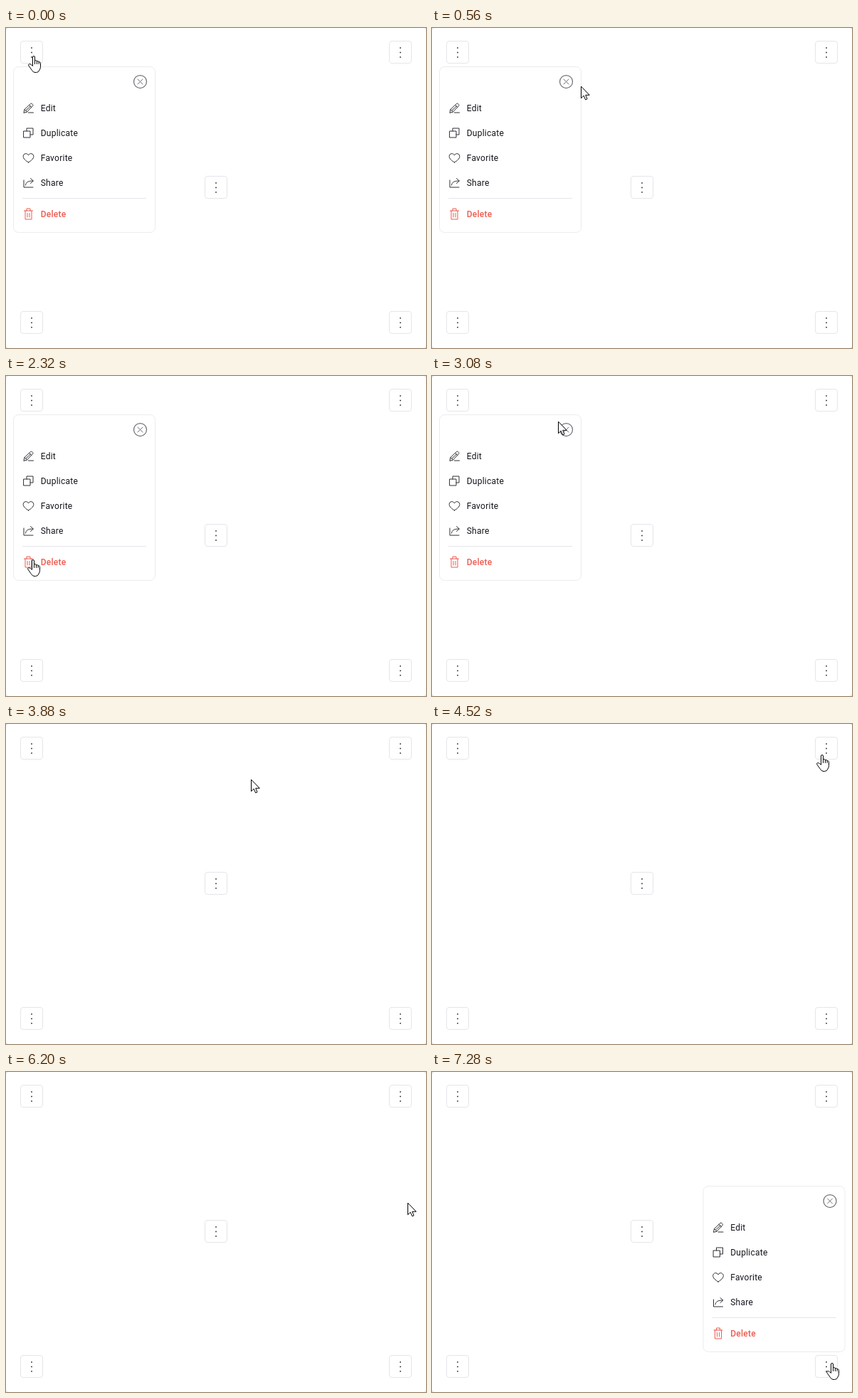
Animation of 590 by 450 pixels, one loop 8 s. Source, as an HTML page with a canvas:

```html
<!DOCTYPE html>
<html lang="en">
<head>
<meta charset="utf-8">
<title>Context menu</title>
<style>
html, body { margin: 0; width: 100%; height: 100%; overflow: hidden; background: #fff; }
canvas { display: block; width: 590px; height: 450px; }
</style>
</head>
<body>
<canvas id="stage" width="590" height="450"></canvas>
<script>
const W = 590, H = 450, LOOP = 8000, STEP = 40;
const MENU_W = 200, MENU_H = 234, BUTTON = 32;
const INK = '#2e2c34', RED = '#ee5a4f', LINE = '#e6e6ec';
const ctx = document.getElementById('stage').getContext('2d');

const left = 20, right = W - left - BUTTON, top_ = 18, bottom = H - left - BUTTON;
const buttons = [[(left + right) / 2, (top_ + bottom) / 2]];
for (const x of [left, right]) for (const y of [top_, bottom]) buttons.push([x, y]);

// A menu hangs from its button, or stands on it near the lower edge.
const menuRight = W - MENU_W - 9.5, below = top_ + BUTTON + 4, above = bottom - MENU_H - 4;
const menus = [
  { from: 0, to: 3680, x: 10, y: below },
  { from: 5200, to: 5920, x: menuRight, y: below },
  { from: 6880, to: LOOP, x: menuRight, y: above }
];

// Each leg starts where the last one ended; a bend pulls it into a curve.
const legs = [];
let last = [38, 39];
function leg(from, to, end, bend) {
  const mid = bend || last.map((v, i) => (v + end[i]) / 2);
  legs.push({ from, to, start: last, mid, end });
  last = end;
}
leg(80, 560, [209, 82], [273, 418]);
leg(560, 800, [183, 73]);
leg(960, 1160, [79, 241]);
leg(1360, 1680, [75, 157], [109, 199]);
leg(1680, 2200, [73, 252], [12, 25]);
leg(2200, 2320, [37, 258]);
leg(2480, 3080, [177, 64]);
leg(3160, 3520, [183, 65], [181, 73]);
leg(3640, 4520, [547, 43], [682, 110]);
leg(5080, 5360, [548, 45], [549, 14]);
leg(6040, 6200, [564, 184]);
leg(6240, 6560, [560, 411]);
leg(6760, 7120, [561, 409], [562, 417]);

function pointerAt(t) {
  const l = legs.findLast(l => t >= l.from) || legs[0];
  const p = Math.min(1, Math.max(0, (t - l.from) / (l.to - l.from)));
  const u = p * p * (3 - 2 * p), v = 1 - u;
  return l.start.map((s, i) => Math.round(v * v * s + 2 * u * v * l.mid[i] + u * u * l.end[i]));
}

const menuAt = t => menus.find(m => t >= m.from && t < m.to);

function clickable(t) {
  const [x, y] = pointerAt(t), m = menuAt(t);
  const inside = (l, top, w, h) => x >= l && x < l + w && y >= top && y < top + h;
  if (m && inside(m.x, m.y, MENU_W, MENU_H)) {
    return inside(m.x + 168, m.y + 11, 21, 21)
      || inside(m.x + 13, m.y + 41, 174, 140)
      || inside(m.x + 13, m.y + 187, 174, 38);
  }
  return buttons.some(b => inside(...b, BUTTON, BUTTON));
}

function box(x, y, w, h, r, fill, stroke) {
  ctx.beginPath();
  ctx.roundRect(x, y, w, h, r);
  ctx.fillStyle = fill;
  ctx.fill();
  if (stroke) {
    ctx.strokeStyle = stroke;
    ctx.lineWidth = 1;
    ctx.stroke();
  }
}

function disc(x, y, r) {
  ctx.beginPath();
  ctx.arc(x, y, r, 0, Math.PI * 2);
}

function shape(path, stroke, fill) {
  if (fill) {
    ctx.fillStyle = fill;
    ctx.fill(path);
  }
  ctx.strokeStyle = stroke;
  ctx.lineWidth = 1;
  ctx.stroke(path);
}

function at(x, y, draw) {
  ctx.save();
  ctx.translate(x, y);
  draw();
  ctx.restore();
}

// Icons are drawn around their own centre.
const P = d => new Path2D(d);
const icons = {
  Edit: P('M-6.5 6.5L-5.5 2L3 -6Q4 -7 5 -6L6 -5Q7 -4 6 -3L-2 5.5ZM-5.5 2L-2 5.5M1 -4L4.5 -.7M-3.5 3.5L3 -2.5M0 6.5H7'),
  Duplicate: P('M-6.5 -2.5H2.5V6.5H-6.5ZM-2.5 -2.5V-6.5H6.5V2.5H2.5'),
  Favorite: P('M0 6.5C-4 4 -7.3 1.3 -7.3 -2C-7.3 -6 -2 -7.5 0 -3.5C2 -7.5 7.3 -6 7.3 -2C7.3 1.3 4 4 0 6.5Z'),
  Share: P('M-6.5 -3.5V6.5H6.5M-4 3.5C-3.5 -.5 -1 -2.5 6.5 -2.5M3 -6L6.8 -2.5L3 1'),
  Delete: P('M-6 -4.5H6M-2.5 -4.5V-7.5H2.5V-4.5M-4.5 -4.5V7.5H4.5V-4.5M-1.5 -1V4.5M1.5 -1V4.5')
};
const cross = P('M-3.5 -3.5L3.5 3.5M3.5 -3.5L-3.5 3.5');
const arrow = P('M.5 .5V16.7L4.2 13.2L6.6 18.8L9 17.8L6.7 12.3H11.8Z');
const hand = P('M6.5 14V2Q6.5 .5 8 .5Q9.5 .5 9.5 2V7.2Q10.2 6.3 11.3 6.6Q12.4 6.9 12.4 8Q13.2 7.3 14.2 7.7Q15.1 8 15.1 9Q16 8.5 16.8 9Q17.5 9.4 17.5 10.5V15.5Q17.5 18 16 20Q15 23.5 11.5 23.5H10Q7 23.5 5.5 20.5L1 14.2Q0 12.5 1.3 11.8Q2.6 11.2 4 12.2Z');
const knuckles = P('M9.5 7.2V11.5M12.4 8V11.5M15.1 9V11.5');

function drawButton([x, y]) {
  box(x + .5, y + .5, BUTTON - 1, BUTTON - 1, 3.5, '#fff', LINE);
  ctx.fillStyle = '#333138';
  for (let i = -1; i <= 1; i++) {
    disc(x + 16, y + 16.4 + i * 6.5, .95);
    ctx.fill();
  }
}

function drawMenu() {
  box(.5, .5, MENU_W - 1, MENU_H - 1, 7, '#fff', '#ececf1');
  at(178.5, 21.5, () => {
    disc(0, 0, 9);
    ctx.strokeStyle = '#706e79';
    ctx.lineWidth = 1.25;
    ctx.stroke();
    shape(cross, '#706e79');
  });
  ctx.letterSpacing = '0.25px';
  Object.entries(icons).forEach(([label, icon], i) => {
    const danger = label === 'Delete', y = 59 + i * 35 + (danger ? 9 : 0);
    at(22, y, () => {
      ctx.translate(-.5, -.5);
      shape(icon, danger ? RED : INK);
    });
    ctx.font = (danger ? 500 : 400) + ' 12px Roboto, Arial, sans-serif';
    ctx.fillStyle = danger ? RED : '#15131c';
    ctx.fillText(label, 38.7, y + 4);
  });
  ctx.fillStyle = LINE;
  ctx.fillRect(13, 185, 174, 1);
}

function drawPointer(t) {
  const [x, y] = pointerAt(t);
  // The pointer's form follows its place one step late.
  if (clickable(t - STEP)) {
    at(x - 7, y, () => {
      shape(hand, '#000', '#fff');
      shape(knuckles, '#000');
    });
  } else {
    at(x, y, () => shape(arrow, '#000', '#fff'));
  }
}

function frame(now) {
  const t = Math.floor(now % LOOP / STEP) * STEP;
  ctx.lineJoin = ctx.lineCap = 'round';
  ctx.fillStyle = '#e3e3e7';
  ctx.fillRect(0, 0, W, H);
  box(0, 0, W, H, 4, '#fff');
  buttons.forEach(drawButton);
  const m = menuAt(t);
  if (m) at(m.x, m.y, drawMenu);
  drawPointer(t);
}

const start = performance.now();
function tick() {
  frame(performance.now() - start);
  requestAnimationFrame(tick);
}
tick();
</script>
</body>
</html>
```
